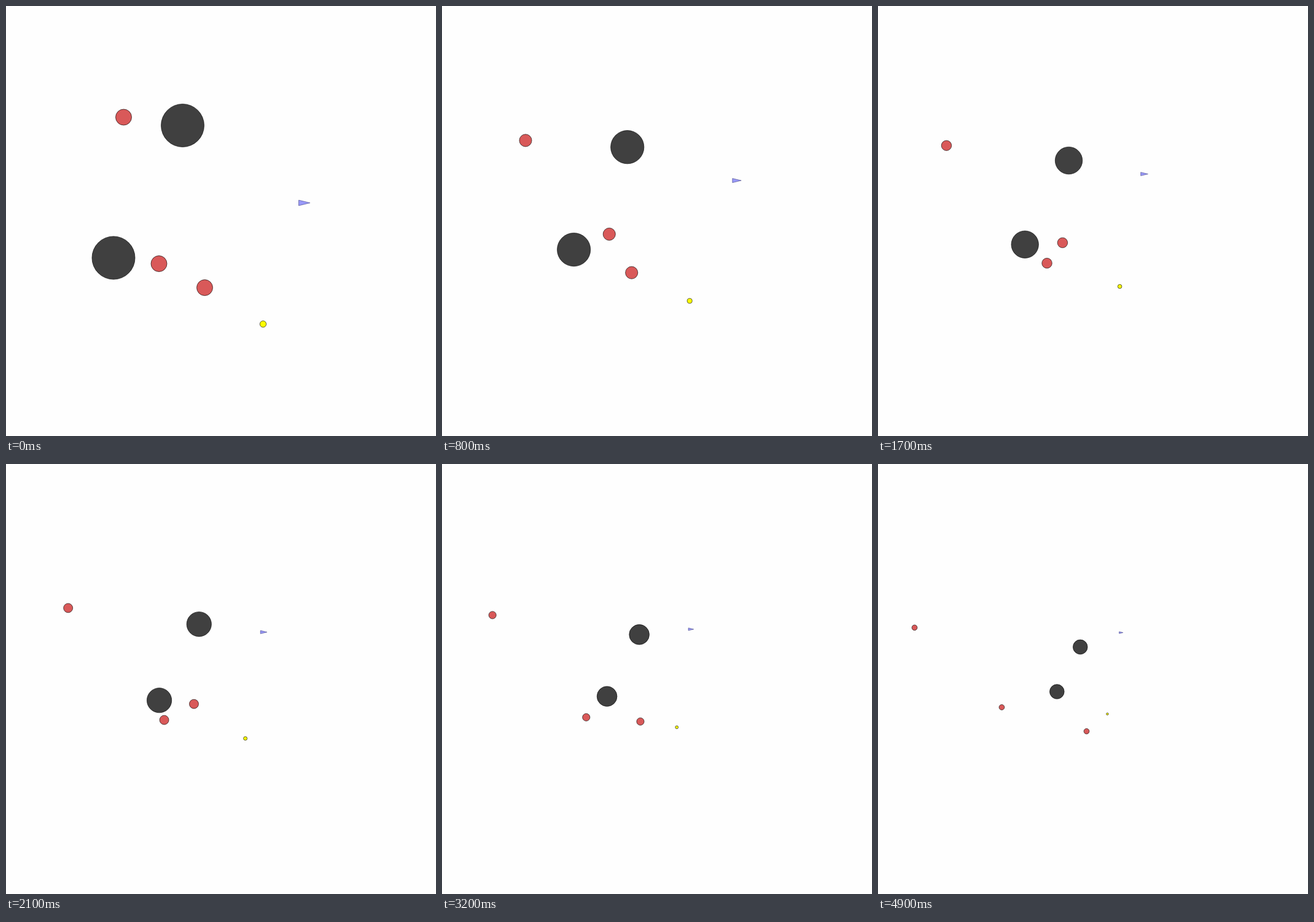
An HTML page with a canvas that plays this animation: 700 px wide and 700 px high, repeating every 5 s.

```html
<!DOCTYPE html>
<html lang="en">
<head>
<meta charset="utf-8">
<title>Agents</title>
<style>
  html, body { margin: 0; width: 100%; height: 100%; overflow: hidden; background: #fefefe; }
  canvas { display: block; width: 700px; height: 700px; }
</style>
</head>
<body>
<canvas id="stage" width="700" height="700"></canvas>
<script>
const ctx = document.getElementById('stage').getContext('2d');
const LOOP = 5000, STEP = 100, HALF = 350, MID = 350.5;
const EDGE = 175; // the view widens once the leader passes this line
const WHITE = '#fefefe', RED = '#d95959', DARK = '#404040', YELLOW = '#ffff00', BLUE = '#9999f8';

// Turning points of each path: [seconds, x, y], measured from the view centre.
const leader = [[0, -159, -169.5], [0.8, -277, -170], [1.7, -377, -194.5], [2.6, -506, -210],
  [3.2, -575, -224], [4.1, -732, -231], [4.9, -863, -249.5]];
const chaser = [[0, -101.5, 69], [0.8, -101, 27], [1.7, -79, 55], [2.6, -75, 96],
  [4.1, -33.7, 225.4], [4.9, -32.6, 250.7]];
const drifter = [[0, -27, 108], [0.8, -54, 108], [1.7, -119, 107.5], [2.6, -215, 126.5],
  [3.2, -248, 132.5], [4.9, -442, 135]];
const dart = [[0, 126, -30], [0.7, 159, -80], [1.3, 134, -108], [2.6, 103.5, -150],
  [4.1, 123.5, -211], [4.9, 125, -225.5]];

const rocks = [[-63, -156], [-175.5, 59.5]];
const goal = [68, 167.3];

// Smooth curve through the turning points (cubic Hermite)
function follow(path, t) {
  const at = i => path[Math.min(Math.max(i, 0), path.length - 1)];
  const slope = (i, k) => (at(i + 1)[k] - at(i - 1)[k]) / (at(i + 1)[0] - at(i - 1)[0]);
  let i = 0;
  while (i < path.length - 2 && t >= path[i + 1][0]) i++;
  const a = path[i], b = path[i + 1], d = b[0] - a[0], u = (t - a[0]) / d, v = 1 - u;
  return [1, 2].map(k =>
    v * v * (1 + 2 * u) * a[k] + u * u * (3 - 2 * u) * b[k] +
    d * u * v * (v * slope(i, k) - u * slope(i + 1, k)));
}

function paint(fill) {
  ctx.fillStyle = fill;
  ctx.fill();
  ctx.stroke();
}

function disc([x, y], r, zoom, fill) {
  ctx.beginPath();
  ctx.arc(MID + x * zoom, MID + y * zoom, r * zoom, 0, Math.PI * 2);
  paint(fill);
}

function arrow([x, y], zoom, fill) {
  const px = MID + x * zoom, py = MID + y * zoom;
  ctx.beginPath();
  ctx.moveTo(px, py - 4.5 * zoom);
  ctx.lineTo(px + 18.5 * zoom, py);
  ctx.lineTo(px, py + 4.5 * zoom);
  ctx.closePath();
  paint(fill);
}

function draw(t) {
  // Zoom out just enough to keep the leader in range
  const zoom = HALF / Math.max(HALF, EDGE - follow(leader, t)[0]);
  ctx.fillStyle = WHITE;
  ctx.fillRect(0, 0, 2 * HALF, 2 * HALF);
  ctx.strokeStyle = 'rgba(0, 0, 0, 0.62)';
  for (const rock of rocks) disc(rock, 35, zoom, DARK);
  for (const path of [leader, chaser, drifter]) disc(follow(path, t), 13, zoom, RED);
  disc(goal, 5.2, zoom, YELLOW);
  ctx.strokeStyle = 'rgba(40, 40, 110, 0.5)';
  arrow(follow(dart, t), zoom, BLUE);
}

function tick() {
  const ms = performance.now() % LOOP;
  draw(Math.floor(ms / STEP) * STEP / 1000);
  requestAnimationFrame(tick);
}
tick();
</script>
</body>
</html>
```
